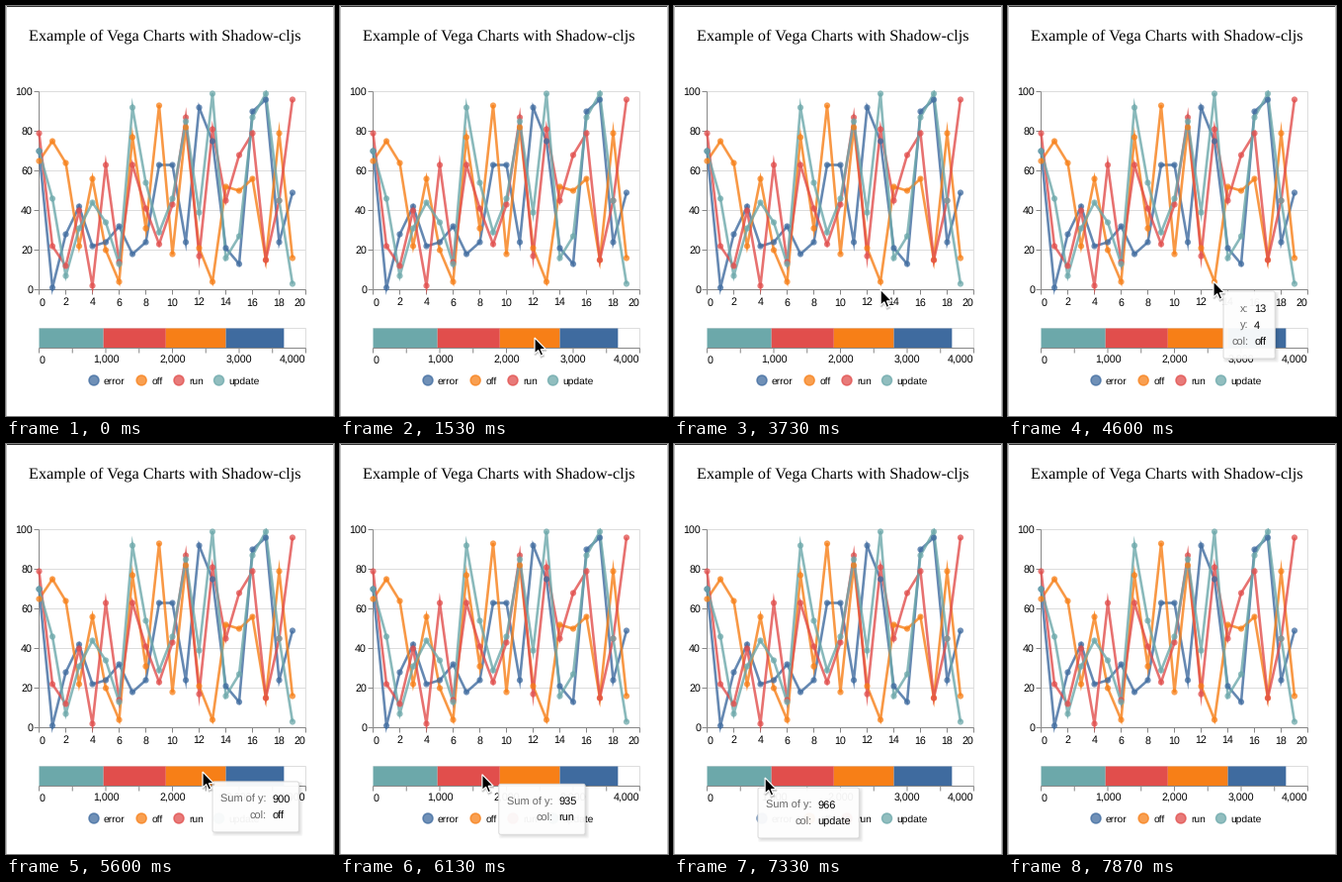
Recreate the animation shown at these times as a matplotlib script. Size 332 px wide and 414 px high, loop 8.8 s.

```python
import numpy as np
import matplotlib.pyplot as plt
from matplotlib.animation import FuncAnimation
from matplotlib.patches import Circle, FancyBboxPatch, Polygon, Rectangle
from matplotlib.textpath import TextPath

plt.rcParams.update({"path.snap": False, "text.hinting": "none"})

W, H, DPI = 332, 414, 64
PT = 72 / DPI  # points per pixel
LOOP, INTERVAL, FPS = 8800, 40, 15
SANS, SERIF = "Liberation Sans", "Liberation Serif"
LEFT, RIGHT, TOP, BASE = 33.5, 303.5, 86.5, 286.5
BAR_TOP, BAR_BASE = 325.5, 345.5
AXIS, GRID = "#888888", "#dddddd"

COLORS = {"error": "#3f6b9f", "off": "#f77f17", "run": "#e14e4c", "update": "#6ca8aa"}
# The plotted readings; bar lengths and tooltip sums follow from them
DATA = {
    "error": [70, 1, 28, 42, 22, 24, 32, 18, 24, 63, 63, 24, 92, 75, 21, 13, 90, 96, 24, 49],
    "off": [65, 75, 64, 22, 56, 20, 4, 77, 31, 93, 18, 82, 21, 4, 52, 50, 56, 15, 79, 16],
    "run": [79, 22, 12, 40, 2, 63, 14, 63, 41, 23, 43, 87, 17, 81, 45, 68, 79, 15, 45, 96],
    "update": [70, 46, 7, 31, 44, 34, 13, 92, 54, 29, 46, 85, 39, 99, 16, 27, 87, 99, 45, 3],
}
# Pointer moves: first step, last step, end point, ease-out power
START = (340, 352)
MOVES = [
    (8, 23, (197, 335), 2),
    (39, 42, (217, 344), 1),
    (49, 63, (208, 278), 3),
    (76, 84, (199, 331), 3),
    (84, 102, (75, 337), 1),
    (109, 117, (212, 337), 1),
]
SHOW, HIDE, HOVER = 8, 118, 39
ARROW = np.array([(0, 0), (0, 16), (3.7, 12.6), (6.2, 18.2), (8.7, 17.1), (6.3, 11.6), (11.3, 11.6)])

fig = plt.figure(figsize=(W / DPI, H / DPI), dpi=DPI, facecolor="white")
ax = fig.add_axes([0, 0, 1, 1])
ax.set(xlim=(0, W), ylim=(H, 0))
ax.axis("off")


def px(v):
    return LEFT + v * (RIGHT - LEFT) / 20


def py(v):
    return BASE - v * (BASE - TOP) / 100


def bx(v):
    return LEFT + v * (RIGHT - LEFT) / 4000


def line(x0, y0, x1, y1, color=AXIS, z=1):
    ax.plot([x0, x1], [y0, y1], color=color, lw=PT, zorder=z, solid_capstyle="butt")


def label(x, y, s, size=10.6, ha="left", color="black", font=SANS, z=6):
    return ax.text(x, y, s, fontsize=size * PT, family=font, ha=ha, va="baseline", color=color, zorder=z)


def flush_label(x, y, s):
    ha = "left" if x == LEFT else "right" if x == RIGHT else "center"
    label(x, y, s, ha=ha)


def text_width(s, size=11):
    return TextPath((0, 0), s, size=size, prop={"family": SANS}).get_extents().width


def stroke(pts, width, limit=10):
    """Outline of a polyline with long mitred corners."""
    d = np.diff(pts, axis=0)
    n = np.column_stack([-d[:, 1], d[:, 0]]) / np.hypot(*d.T)[:, None]
    offs = [(pts[0], n[0])]
    for p, a, b in zip(pts[1:-1], n, n[1:]):
        k = 1 + a @ b
        if 2 / k < limit ** 2:
            offs.append((p, (a + b) / k))
        else:
            offs += [(p, a), (p, b)]
    offs.append((pts[-1], n[-1]))
    h = width / 2
    return [p + o * h for p, o in offs] + [p - o * h for p, o in offs[::-1]]


# Window edge and heading
line(0, 0.5, W, 0.5, "#333333")
line(0.5, 0, 0.5, H, "#c4c4c4")
line(W - 0.5, 0, W - 0.5, H, "#c4c4c4")
label(23, 35, "Example of Vega Charts with Shadow-cljs", 16.2, font=SERIF)

# Line chart
for v in range(0, 101, 20):
    line(LEFT, py(v), RIGHT, py(v), GRID)
    line(LEFT - 5, py(v), LEFT, py(v), z=2)
    label(LEFT - 6.5, py(v) + 3.5, str(v), ha="right")
for v in range(0, 21, 2):
    line(px(v), BASE, px(v), BASE + 5, z=2)
    flush_label(px(v), 302.5, str(v))
line(RIGHT, TOP, RIGHT, BASE, GRID)
line(LEFT, TOP, LEFT, BASE, z=2)
line(LEFT, BASE, RIGHT, BASE, z=2)

for name, ys in DATA.items():
    pts = np.column_stack([px(np.arange(20)), py(np.array(ys))])
    ax.add_patch(Polygon(stroke(pts, 2.6), fc=COLORS[name], lw=0, alpha=0.8, zorder=3))
    for p in pts:
        ax.add_patch(Circle(p, 3.1, fc=COLORS[name], lw=0, alpha=0.75, zorder=4))

# Stacked bar
segments, total = [], 0
for name in reversed(DATA):
    value = sum(DATA[name])
    x0, x1 = bx(total), bx(total + value)
    ax.add_patch(Rectangle((x0, BAR_TOP), x1 - x0, BAR_BASE - BAR_TOP, fc=COLORS[name], lw=0, zorder=2))
    segments.append((x0, x1, name, value))
    total += value
line(LEFT, BAR_TOP, RIGHT, BAR_TOP, GRID)
line(RIGHT, BAR_TOP, RIGHT, BAR_BASE, GRID)
line(LEFT, BAR_BASE, RIGHT, BAR_BASE, z=3)
for v in range(0, 4001, 500):
    line(bx(v), BAR_BASE, bx(v), BAR_BASE + 5, z=2)
    if v % 1000 == 0:
        flush_label(bx(v), 360.5, f"{v:,}")

# Legend, laid out by label width
x = 89
for name, color in COLORS.items():
    ax.add_patch(Circle((x, 378), 5, fc=color, ec=color, lw=1.5 * PT, alpha=0.75, zorder=3))
    label(x + 10, 381.5, name, 10.3)
    x += 27 + text_width(name, 10.3)


class Tooltip:
    def __init__(self):
        def box(z, **style):
            return ax.add_patch(FancyBboxPatch((0, 0), 1, 1, boxstyle="round,pad=0,rounding_size=2",
                                               zorder=z, **style))
        self.shadows = [box(9, fc="black", lw=0, alpha=0.035) for _ in range(4)]
        self.box = box(10, fc=(1, 1, 1, 0.95), ec="#dadada", lw=PT)
        self.keys = [label(0, 0, "", 11, "right", "#666666", z=11) for _ in range(3)]
        self.values = [label(0, 0, "", 11, z=11) for _ in range(3)]

    def draw(self, x, y, rows):
        for art in [*self.shadows, self.box, *self.keys, *self.values]:
            art.set_visible(bool(rows))
        if not rows:
            return
        kw = max(text_width(k) for k, _ in rows)
        w = kw + max(text_width(v) for _, v in rows) + 25
        h = 17 * len(rows) + 17
        self.box.set_bounds(x, y, w, h)
        for i, s in enumerate(self.shadows):
            g = i - 1
            s.set_bounds(x + 2 - g, y + 2 - g, w + 2 * g, h + 2 * g)
        for i, (key, value) in enumerate(zip(self.keys, self.values)):
            k, v = rows[i] if i < len(rows) else ("", "")
            base = y + 21 + 17 * i
            key.set(text=k, position=(x + 10 + kw, base))
            value.set(text=v, position=(x + 15.5 + kw, base))


tooltip = Tooltip()
cursor_shadow = ax.add_patch(Polygon(ARROW, fc="black", lw=2 * PT, ec="black", alpha=0.15, zorder=12))
cursor = ax.add_patch(Polygon(ARROW, fc="black", ec="white", lw=1.2 * PT, zorder=13))


def pointer(step):
    pos = np.array(START, float)
    for first, last, end, power in MOVES:
        t = np.clip((step - first) / (last - first), 0, 1)
        pos += (np.array(end) - pos) * (1 - (1 - t) ** power)
    return pos


def hit(x, y):
    if np.hypot(x - px(13), y - py(DATA["off"][13])) < 6:
        return [("x:", "13"), ("y:", str(DATA["off"][13])), ("col:", "off")]
    if BAR_TOP <= y <= BAR_BASE:
        for x0, x1, name, value in segments:
            if x0 <= x < x1:
                return [("Sum of y:", str(value)), ("col:", name)]
    return []


def update(i):
    step = int((i + 1) * INTERVAL * FPS / 1000)
    shown = SHOW <= step < HIDE
    for art in (cursor, cursor_shadow):
        art.set_visible(shown)
    tip = pointer(step)
    cursor.set_xy(tip + ARROW)
    cursor_shadow.set_xy(tip + ARROW + (0.5, 1.5))

    # The tooltip trails the pointer by one step
    x, y = pointer(step - 1)
    tooltip.draw(x + 10, y + 10, hit(x, y) if shown and step > HOVER else [])
    return []


anim = FuncAnimation(fig, update, frames=LOOP // INTERVAL, interval=INTERVAL,
                     init_func=lambda: update(0), repeat=True, repeat_delay=0, blit=False)
plt.show()
```
